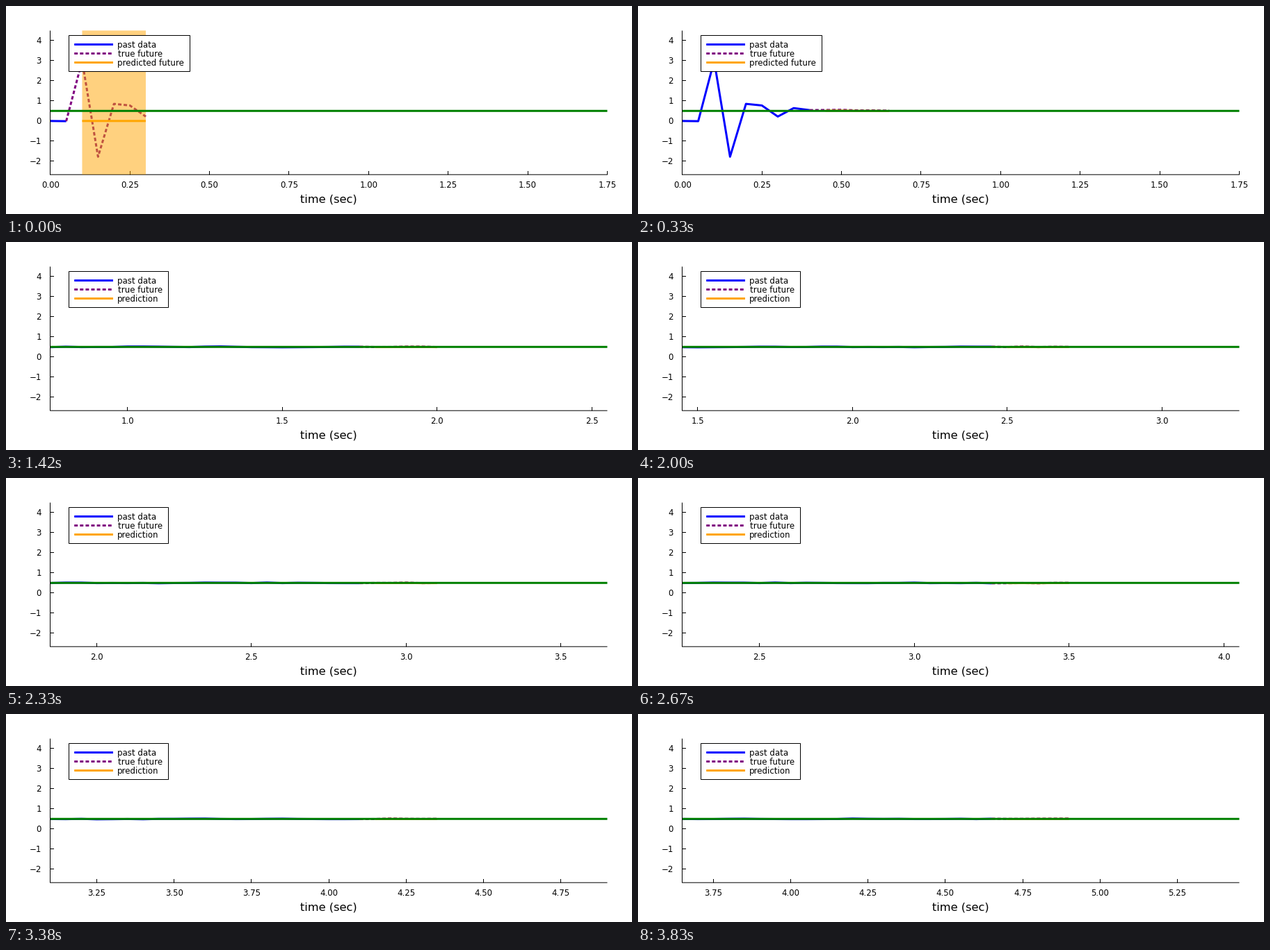
Animation of 900 by 300 pixels, one loop 3.87 s. Source, as a matplotlib script:

```python
import math
import numpy as np
import matplotlib.pyplot as plt
from matplotlib.animation import FuncAnimation
from matplotlib.patches import Rectangle

W, H, DPI = 900, 300, 100
PT = 72 / DPI                      # points per pixel
LEFT, RIGHT, TOP, BOTTOM = 63.7, 864.5, 35.4, 243.1
Y_MIN, Y_MAX = -2.66, 4.49
STEPS, LOOP_MS = 93, 3870
DT, HORIZON, GOAL = 0.05, 5, 0.5
SHADED_STEPS = 5

plt.rcParams["font.family"] = "DejaVu Sans"


def make_output():
    """Controlled output: a wild start that settles around the goal."""
    start = [0, -0.01, 2.99, -1.775, 0.85, 0.77, 0.22, 0.64, 0.54, 0.545,
             0.555, 0.525, 0.525, 0.51, 0.475, 0.485, 0.51, 0.49, 0.495, 0.495,
             0.52, 0.52, 0.512, 0.5, 0.49, 0.515, 0.525, 0.505, 0.488, 0.485,
             0.48, 0.485, 0.49, 0.497, 0.51, 0.508]
    rng = np.random.default_rng(4)
    out, dev = list(start), 0.0
    while len(out) < STEPS + HORIZON + 2:
        dev = 0.5 * dev + rng.normal(0, 0.01)
        out.append(GOAL + max(-0.02, min(0.03, dev)))
    return np.array(out)


y = make_output()
t = np.arange(len(y)) * DT


def to_y(v):
    return TOP + (Y_MAX - np.asarray(v)) / (Y_MAX - Y_MIN) * (BOTTOM - TOP)


def to_x(v, lo, hi):
    return LEFT + (np.asarray(v) - lo) / (hi - lo) * (RIGHT - LEFT)


def crisp(v):
    """Centre of the pixel that holds v."""
    return math.floor(v) + 0.5


fig = plt.figure(figsize=(W / DPI, H / DPI), dpi=DPI, facecolor="white")
ax = fig.add_axes([0, 0, 1, 1])
ax.set_xlim(0, W)
ax.set_ylim(H, 0)
ax.axis("off")
area = Rectangle((LEFT, TOP), RIGHT - LEFT, BOTTOM - TOP, transform=ax.transData)


def stroke(color, z, dashed=False, xs=(), ys=(), clip=True):
    line, = ax.plot(xs, ys, color=color, lw=3 * PT, zorder=z, snap=False,
                    solid_capstyle="butt", dash_capstyle="butt",
                    solid_joinstyle="round", dash_joinstyle="round")
    if dashed:
        line.set_linestyle((0, (1.65, 1.05)))
    if clip:
        line.set_clip_path(area)
    return line


def thin(xs, ys):
    return ax.plot(xs, ys, color="black", lw=PT, zorder=2, snap=False,
                   solid_capstyle="butt")[0]


def label(x, base, text, size=11.7, ha="center", z=3):
    return ax.text(x, base, text, fontsize=size * PT, ha=ha, va="baseline",
                   color="black", zorder=z)


# Axes
thin([63.5, 63.5], [35.5, 243.5])
thin([63.5, 864.5], [243.2, 243.2])
for v in range(-2, 5):
    row = float(to_y(v))
    thin([63.5, 69], [crisp(row)] * 2)
    label(51, row + 4.5, str(v).replace("-", "\u2212"), ha="right")
label(464.3, 284, "time (sec)", 16.2)
ticks = thin([], [])
tick_labels = [label(0, 261.6, "") for _ in range(8)]

# Curves
past = stroke("blue", 4)
future = stroke("purple", 5, dashed=True)
shade = ax.add_patch(Rectangle((0, TOP), 0, BOTTOM - TOP, fc="orange",
                               alpha=0.5, lw=0, zorder=6, snap=False))
guess = stroke("orange", 7)
stroke("green", 8, xs=[LEFT, RIGHT], ys=[to_y(GOAL)] * 2)

# Legend
box = ax.add_patch(Rectangle((90.5, 42.5), 174, 52, fc="white", ec="black",
                             lw=PT, zorder=10, snap=False))
names = []
for i, (color, name, x) in enumerate([("blue", "past data", 160),
                                      ("purple", "true future", 161),
                                      ("orange", "predicted future", 160)]):
    row = 55.5 + 13 * i
    stroke(color, 11, color == "purple", [98.2, 154], [row, row], clip=False)
    names.append(label(x, row + 4.5, name, ha="left", z=11))


def tick_values(lo, hi, scrolling):
    eps = 1e-6
    first = math.ceil(lo / 0.5 - eps) * 0.5
    step = 0.5 if scrolling and first + 1.5 <= hi + eps else 0.25
    n0, n1 = math.ceil(lo / step - eps), math.floor(hi / step + eps)
    return [n * step for n in range(n0, n1 + 1)], 1 if step == 0.5 else 2


def predict(k):
    """Flat at first, then quickly learning the output."""
    skill = 1 - math.exp(-0.7 * k)
    ahead = y[k + 2:k + 2 + HORIZON]
    return skill * (0.4 * ahead + 0.6 * 0.49)


def draw(k):
    now = (k + 1) * DT
    scrolling = now > 0.975
    lo, hi = (now - 1, now + 0.8) if scrolling else (0, 1.75)

    past.set_data(to_x(t[:k + 2], lo, hi), to_y(y[:k + 2]))
    end = k + 2 + HORIZON
    future.set_data(to_x(t[k + 1:end], lo, hi), to_y(y[k + 1:end]))
    xs = to_x(t[k + 2:end], lo, hi)
    guess.set_data(xs, to_y(predict(k)))
    shade.set_visible(k < SHADED_STEPS)
    shade.set_x(xs[0])
    shade.set_width(xs[-1] - xs[0])

    values, digits = tick_values(lo, hi, scrolling)
    cols = [float(to_x(v, lo, hi)) for v in values]
    ticks.set_data([x for c in cols for x in (crisp(c), crisp(c), np.nan)],
                   [238, 243.5, np.nan] * len(cols))
    for i, text in enumerate(tick_labels):
        text.set_visible(i < len(cols))
        if i < len(cols):
            text.set_x(cols[i])
            text.set_text(f"{values[i]:.{digits}f}")

    names[2].set_text("prediction" if scrolling else "predicted future")
    box.set_width(143 if scrolling else 174)
    return []


anim = FuncAnimation(fig, draw, frames=STEPS, init_func=lambda: draw(0),
                     interval=LOOP_MS / STEPS, repeat=True, repeat_delay=0,
                     blit=False)
plt.show()
```
